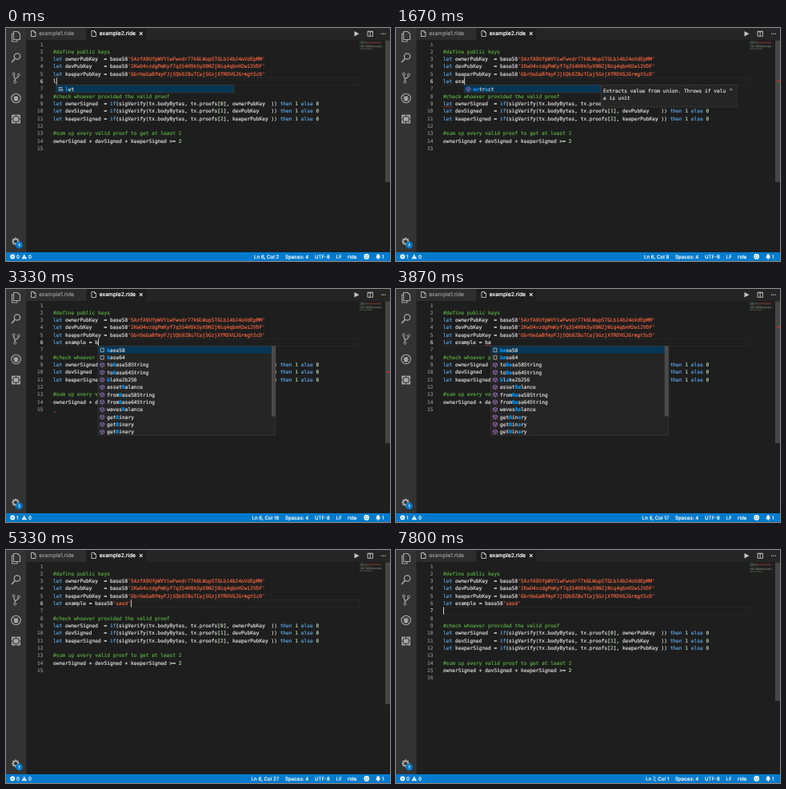
These frames come from a looping animation (480x292 px, 8 s). An HTML page with a canvas:

```html
<!DOCTYPE html>
<html lang="en">
<head>
<meta charset="utf-8">
<title>Code completion in an editor</title>
<style>
  html, body { margin: 0; width: 100%; height: 100%; overflow: hidden; background: #1e1e1e; }
  canvas { display: block; }
</style>
</head>
<body>
<canvas id="stage" width="480" height="292"></canvas>
<script>
const ctx = document.getElementById('stage').getContext('2d');
const LOOP = 8000, BLINK = 500;
const LEFT = 59, TOP = 15.6, CHAR = 3.732, ROW = 9.32;
const MONO = '6.2px "DejaVu Sans Mono", monospace';
const SANS = 'Inter, sans-serif';
const TEXT = '#d4d4d4', BLUE = '#569cd6', GREEN = '#55a03f', RED = '#e2603f', NUMBER = '#b5cea8';

const signers = [
  ['owner', '5AzfA9UfpWVYiwFwvdr77k6LWupSTGLb14b24oVdEpMM'],
  ['dev', '2KwU4vzdgPmKyf7q354H9kSyX9NZjNiq4qbnH2wi2VDF'],
  ['keeper', 'GbrUeGaBfmyFJjSQb9Z8uTCej5GzjXfRDVGJGrmgtScD'],
];
const pad = (name, suffix) => (name + suffix).padEnd(12);
const head = ['', '#define public keys',
  ...signers.map(([name, key]) => `let ${pad(name, 'PubKey')} = base58'${key}'`)];
const tail = ['', '#check whoever provided the valid proof',
  ...signers.map(([name], i) => `let ${pad(name, 'Signed')} = if(sigVerify(tx.bodyBytes, ` +
    `tx.proofs[${i}], ${pad(name, 'PubKey')} )) then 1 else 0`),
  '', '#sum up every valid proof to get at least 2',
  signers.map(([name]) => name + 'Signed').join(' + ') + ' >= 2', ''];

// Key presses: time and typed text, '\b' deletes one character
const keys = [
  [0, 'l'], [70, 'e'], [330, 't'], [670, ' '], [1000, 'e'], [1330, 'x'], [1600, 'a'],
  [1870, 'm'], [2000, 'p'], [2200, 'l'], [2330, 'e'], [2600, ' '], [2800, '='], [3000, ' '],
  [3330, 'b'], [3365, 'a'], [4000, 'se58'], [4200, "'"], [4470, 's'], [4800, 'a'],
  [4870, 's'], [5000, 'd'], [5330, "'"], [5800, '\n'], [6270, ' '], [7730, '\b'],
];

// Syntax errors: start time, row, column, length
const errors = [[1000, 8, 0, 3], [2800, 14, 0, 1], [3600, 5, 14, 2], [4200]];

const bItems = ['base58', 'base64', 'toBase58String', 'toBase64String', 'blake2b256', 'assetBalance',
  'fromBase58String', 'fromBase64String', 'wavesBalance', 'getBinary', 'getBinary', 'getBinary'];
const suggestions = {
  l: ['let'], le: ['let'], let: ['let'],
  e: ['else', 'extract'], ex: ['extract'], exa: ['extract'],
  b: bItems, ba: bItems,
};

function rect(x, y, w, h, color) {
  ctx.fillStyle = color;
  ctx.fillRect(x, y, w, h);
}

function frame(x, y, w, h, color) {
  ctx.strokeStyle = color;
  ctx.lineWidth = 0.5;
  ctx.strokeRect(x, y, w, h);
}

function line(d, color, width = 1) {
  ctx.strokeStyle = color;
  ctx.lineWidth = width;
  ctx.stroke(new Path2D(d));
}

function fill(d, color) {
  ctx.fillStyle = color;
  ctx.fill(new Path2D(d));
}

function circle(x, y, r, color, width) {
  ctx.beginPath();
  ctx.arc(x, y, r, 0, 7);
  ctx.fillStyle = ctx.strokeStyle = color;
  ctx.lineWidth = width;
  width ? ctx.stroke() : ctx.fill();
}

// Glyphs get a hairline outline for slightly heavier strokes
function glyphs(str, x, y, color) {
  ctx.fillStyle = ctx.strokeStyle = color;
  ctx.lineWidth = 0.22;
  ctx.fillText(str, x, y);
  ctx.strokeText(str, x, y);
}

function code(str, x, y, color, bold) {
  ctx.font = (bold ? 'bold ' : '') + MONO;
  ctx.textAlign = 'left';
  [...str].forEach((c, i) => c !== ' ' && glyphs(c, x + i * CHAR, y, color));
}

function label(str, x, y, size = 6.2, color = '#fff', align = 'left') {
  ctx.font = `${size}px ${SANS}`;
  ctx.textAlign = align;
  glyphs(str, x, y, color);
}

const rowTop = row => TOP + row * ROW;

function tokenColor(str) {
  if (str[0] === '#') return GREEN;
  if (str[0] === "'") return RED;
  if (/^(let|if|then|else)$/.test(str)) return BLUE;
  return /^\d+$/.test(str) ? NUMBER : TEXT;
}

function tokens(str) {
  return [...str.matchAll(/#.*|'[^']*'|\w+|[^\s\w'#]+/g)]
    .map(m => ({ str: m[0], at: m.index, color: tokenColor(m[0]) }));
}

function drawActivityBar() {
  const grey = '#a8a8a8', back = '#333333';
  rect(0, 0, 25.5, 281, back);
  line('M9 7H7.5V17H14V15M9.5 4.5H14.5L17.5 7.5V14.5H9.5Z', grey, 1.1);
  circle(14, 35.5, 3.7, grey, 1.3);
  line('M11.3 38.3L7 43', grey, 1.7);
  circle(9.6, 57.6, 1.5, grey, 1);
  circle(15.8, 58.6, 1.5, grey, 1);
  circle(11.2, 67.6, 1.5, grey, 1);
  line('M9.8 59.2Q10.2 62 11.2 63.5V66M15.6 60.2Q15 62.5 11.2 64', grey, 1.3);
  circle(12.5, 88, 5.8, grey, 1.1);
  line('M8.5 84L16.5 92M9 88H16M9.5 91.5L11 90M15.5 84.5L14 86', grey, 1);
  ctx.beginPath();
  ctx.ellipse(12.5, 88.5, 2.2, 3.2, 0, 0, 7);
  ctx.fillStyle = grey;
  ctx.fill();
  rect(7, 108.7, 11, 10.8, grey);
  line('M9 111H16V117.2H9ZM12.5 108.7V111M12.5 117.2V119.5M7 114.1H9M16 114.1H18', back, 1);
  circle(12, 267.5, 3, grey, 1.8);
  for (let i = 0; i < 8; i++) {
    const a = i * Math.PI / 4, dx = Math.cos(a), dy = Math.sin(a);
    line(`M${12 + dx * 3} ${267.5 + dy * 3}L${12 + dx * 5} ${267.5 + dy * 5}`, grey, 1.5);
  }
  circle(16.5, 272, 4.4, '#007acc');
  label('1', 16.5, 273.8, 5, '#fff', 'center');
}

function drawTabs() {
  rect(25.5, 0, 454.5, 15, '#252526');
  rect(25.5, 0, 74.5, 15, '#2d2d2d');
  rect(100.5, 0, 75, 15, '#1e1e1e');
  [['example1.ride', 31, '#929292'], ['example2.ride', 106.5, '#ffffff']].forEach(([name, x, color]) => {
    line(`M${x + 0.5} 3.5H${x + 4}L${x + 6} 5.5V10.5H${x + 0.5}ZM${x + 4} 3.5V5.5H${x + 6}`, '#c5c5c5', 0.9);
    label(name, x + 10.3, 9.4, 6.75, color);
  });
  line('M167 5.2L170.6 8.8M170.6 5.2L167 8.8', '#e8e8e8', 1.1);
  fill('M435.5 4L441.5 7.3L435.5 10.6Z', '#c5c5c5');
  line('M452 4.2H458.5V10.3H452ZM455.2 4.2V10.3M452 4.7H458.5', '#c5c5c5', 0.9);
  for (let x = 469.6; x < 475; x += 2.3) circle(x, 7.3, 0.7, '#c5c5c5');
}

function drawCode(lines, active) {
  frame(LEFT, rowTop(active), 383, ROW, '#303030');
  lines.forEach((str, row) => {
    const y = rowTop(row) + 6.9, number = String(row + 1);
    code(number, 46.4 - number.length * CHAR, y, row === active ? '#c6c6c6' : '#858585');
    tokens(str).forEach(t => code(t.str, LEFT + t.at * CHAR, y, t.color));
  });
}

function drawMinimap(lines) {
  ctx.save();
  ctx.beginPath();
  ctx.rect(442, 14, 28.5, 60);
  ctx.clip();
  ctx.globalAlpha = 0.33;
  lines.forEach((str, row) => tokens(str).forEach(t =>
    rect(442 + t.at * 0.38, TOP + row * 0.8, t.str.length * 0.38, 0.6, t.color)));
  ctx.restore();
}

function drawScrollbar(lineCount) {
  const total = lineCount + 27.4;
  rect(474, TOP, 6, 265 * 28.4 / total, '#464647');
}

function drawError(row, col, length, lineCount) {
  const x = LEFT + col * CHAR, y = rowTop(row + 1) - 0.3;
  let d = `M${x} ${y}`;
  for (let i = 1; i <= length * 2; i++) d += `L${x + i * CHAR / 2} ${y - i % 2 * 1.1}`;
  line(d, '#e04040', 0.6);
  rect(476.5, TOP + row / (lineCount + 27.4) * 265, 3.5, 2, '#b03030');
}

// Positions of the typed letters inside a suggestion
function matches(item, word) {
  const lower = item.toLowerCase(), start = lower.indexOf(word);
  let from = 0;
  return [...word].map((c, i) => {
    if (start >= 0) return start + i;
    const at = lower.indexOf(c, from);
    from = at + 1;
    return at;
  });
}

function drawItemIcon(item, x, y) {
  if (/^base/.test(item)) {
    line(`M${x - 2} ${y - 2.3}H${x + 2}V${y + 2.3}H${x - 2}Z`, '#c5c5c5', 0.8);
  } else if (/^(let|else)$/.test(item)) {
    line(`M${x - 2.5} ${y - 2}H${x + 2.5}M${x - 2.5} ${y}H${x}M${x - 2.5} ${y + 2}H${x}`, '#c5c5c5', 0.9);
    line(`M${x + 0.8} ${y}H${x + 2.8}V${y + 2.2}H${x + 0.8}Z`, '#c5c5c5', 0.8);
  } else {
    line(`M${x} ${y - 2.7}L${x + 2.5} ${y - 1.4}V${y + 1.4}L${x} ${y + 2.7}L${x - 2.5} ${y + 1.4}V${y - 1.4}Z` +
      `M${x - 2.5} ${y - 1.4}L${x} ${y}L${x + 2.5} ${y - 1.4}M${x} ${y}V${y + 2.7}`, '#b180d7', 0.7);
  }
}

function drawPopup(items, word, x, y, detailed) {
  const width = detailed ? 171 : 222, height = items.length * ROW;
  rect(x, y, width, height, '#252526');
  rect(x, y, width, ROW, '#073655');
  frame(x, y, width, height, '#454545');
  items.forEach((item, i) => {
    const top = y + i * ROW, hits = matches(item, word);
    drawItemIcon(item, x + 5.3, top + 5);
    [...item].forEach((c, k) => {
      const hit = hits.includes(k);
      code(c, x + 11.3 + k * CHAR, top + 7.2, hit ? '#0097fb' : TEXT, hit);
    });
  });
  if (items.length > 10) rect(x + width - 5, y, 5, 88, '#4b4b4c');
  if (detailed) {
    const left = x + width;
    rect(left, y, 170, 27.5, '#252526');
    frame(left, y, 170, 27.5, '#454545');
    code('Extracts value from union. Throws if valu', left + 3, y + 9.6, TEXT);
    code('e is unit', left + 3, y + 18.9, TEXT);
    line(`M${left + 161.2} ${y + 4.2}l2.8 2.8m0 -2.8l-2.8 2.8`, '#c5c5c5', 0.7);
  }
}

function drawStatus(errorCount, row, col) {
  const y = 288.7, blue = '#007acc';
  rect(0, 281, 480, 11, blue);
  circle(8.2, 286.5, 3, '#fff');
  line('M7 285.3L9.4 287.7M9.4 285.3L7 287.7', blue, 0.8);
  label(errorCount, 13, y);
  fill('M22.8 283.4L26 289.3H19.6Z', '#fff');
  line('M22.8 285.4V287.4M22.8 288V288.7', blue, 0.7);
  label('0', 28, y);
  label(`Ln ${row + 1}, Col ${col + 1}`, 341.3, y, 6.2, '#fff', 'right');
  label('Spaces: 4', 349, y);
  label('UTF-8', 386, y);
  label('LF', 412.7, y);
  label('ride', 427, y);
  circle(450.7, 286.5, 3.4, '#fff');
  circle(449.5, 285.6, 0.55, blue);
  circle(451.9, 285.6, 0.55, blue);
  line('M448.8 287.2Q450.7 289.4 452.6 287.2', blue, 0.7);
  fill('M462 288.3Q463.2 287.3 463.2 285.4Q463.4 283.3 465.2 283.2Q467 283.3 467.2 285.4Q467.2 287.3 468.4 288.3Z', '#fff');
  circle(465.2, 289, 0.9, '#fff');
  label('1', 470, y);
}

function draw(t) {
  let typed = '', lastKey = 0;
  for (const [time, str] of keys) {
    if (time > t) break;
    typed = str === '\b' ? typed.slice(0, -1) : typed + str;
    lastKey = time;
  }
  const edited = typed.split('\n');
  const row = head.length + edited.length - 1, col = edited.at(-1).length;
  const word = (typed.match(/\w+$/) || [''])[0];
  if (typed.split("'").length % 2 === 0) edited[0] += "'";
  const lines = [...head, ...edited, ...tail];
  const [, ...error] = errors.findLast(([start]) => start <= t) || [];
  const x = LEFT + col * CHAR;

  rect(0, 0, 480, 292, '#1e1e1e');
  drawCode(lines, row);
  drawMinimap(lines);
  drawScrollbar(lines.length);
  if (error.length) drawError(...error, lines.length);
  if ((t - lastKey) % (2 * BLINK) < BLINK) rect(x, rowTop(row), 1, ROW, '#c8c8c8');
  const items = suggestions[word];
  if (items) drawPopup(items, word, x, rowTop(row + 1), items[0] === 'extract' && t >= 1400);
  drawActivityBar();
  drawTabs();
  drawStatus(error.length ? 1 : 0, row, col);
}

function tick() {
  ctx.textRendering = 'geometricPrecision';
  ctx.lineJoin = 'round';
  draw(performance.now() % LOOP);
  requestAnimationFrame(tick);
}
tick();
</script>
</body>
</html>
```
